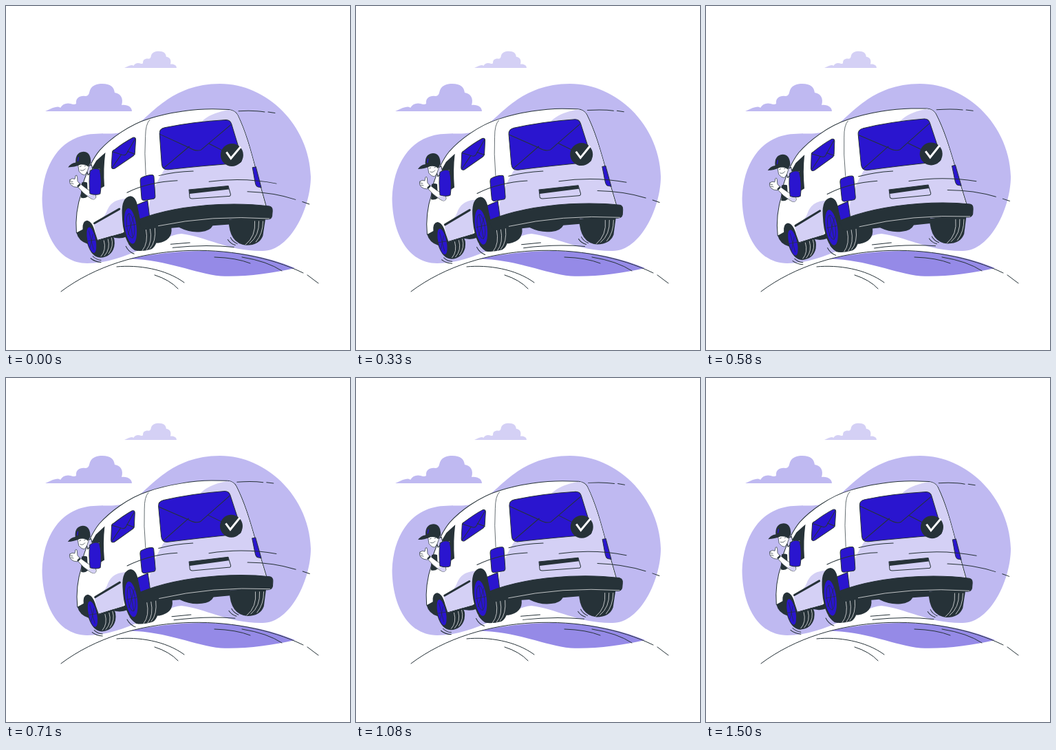
Write an HTML page that moves like this. It is 500 px wide and 500 px high and loops after 1.54 s.

```html
<!DOCTYPE html>
<html lang="en">
<head>
<meta charset="utf-8">
<title>Delivery van</title>
<style>
  html, body { margin: 0; width: 100%; height: 100%; overflow: hidden; background: #fff; }
  svg { display: block; width: 100vw; height: 100vh; }
  .blue { fill: #2a15cf; }
  .pale { fill: #d4d0f5; }
  .soft { fill: #bfb9f1; }
  .mid { fill: #958ae7; }
  .dark { fill: #263238; }
  .white { fill: #fff; }
  .line { stroke: #263238; stroke-width: 1; stroke-linecap: round; stroke-linejoin: round; }
  .thin { stroke-width: .7; }
  .open { fill: none; }
  .tread { fill: none; stroke: #fff; stroke-width: .7; stroke-linecap: round; }
</style>
</head>
<body>
<svg viewBox="0 0 500 500">
  <defs>
    <path id="cloud" d="M57 153L68 148Q77 145 79 148Q84 140 94 142Q99 144 102 142C101 133 108 130 115 131Q120 131 121 126C123 115 132 113 140 113C152 113 157 118 158 126C167 127 171 135 168 144C177 143 183 147 183 153Z"/>
  </defs>

  <path class="soft" d="M118 374C75 374 53 330 52.500 280C54 230 78 194 118 187C143 183 165 190 185 177C210 160 240 113 311 113C380 113 441 174 443 248C443 292 414 356 373 356C325 357 290 335 255 331C225 333 175 374 118 374Z"/>
  <use href="#cloud" class="soft"/>
  <use href="#cloud" class="pale" transform="translate(137.6 -2.3) scale(.603)"/>

  <g id="hill">
    <path class="mid" d="M180 367.500C260 351 345 350 420 381C385 389 345 394 312 392.500C275 389 235 369 180 367.500Z"/>
    <path class="line open" d="M80 415C180 340 335 341 432 388M438 391L454 403M161 379C192 376 232 382 259 402M216 391Q238 398 250 411M303 365Q335 366 355 374M343 365Q380 371 401 385"/>
  </g>

  <g id="van">
    <g id="underside">
      <path class="dark" d="M205 315L325 305L325 317L301 319Q297 327 284 328Q268 330 252 322L241 323Q243 341 222 345L208 345Z"/>
      <path class="dark" d="M324 310Q325 345 350 347Q369 347 374 333L378 305Z"/>
      <path class="tread" d="M368 312Q369 333 355 344M362 312Q364 334 349 346M374 312Q374 330 364 342"/>
      <path class="dark" d="M150 335Q164 341 176 336L176 325Z"/>
    </g>

    <path class="white line" d="M103 331C101 310 104 290 110 272L111 262C117 243 124 225 136 210.500C150 195 178 173 208 164C238 154 275 149.500 300 149.500L323 150Q332 151 336 158C348 182 355 208 363 237L379 292L200 315L170 331L132 342Z"/>
    <path class="pale" d="M323 150.500Q332 151 335.500 158C347 182 355 208 362.500 237L378 292L206 311C206 285 216 260 230 238L270 190C278 168 292 156 323 150.500Z"/>
    <path class="pale" d="M177 281C158 281 151 289 147 299C144 307 138 312 128 318L133 341L170 330.500Z"/>
    <path class="line thin open" d="M208 166Q202 172 202 190L201.500 215L203 246"/>

    <g id="rear">
      <path class="blue line" d="M230 177Q272 168 319 165Q325 165 327 171L342 219Q344 228 335 228Q288 232 236 238Q227 239 226 230L222.500 186Q222 179 230 177Z"/>
      <path class="line open" d="M223.500 187L266 206Q276 212 283 209L326 172M229 236L266 204M295 200L341 223"/>
      <circle class="dark" cx="328" cy="216" r="16.500"/>
      <path d="M320 212L326.500 221L340.500 204" fill="none" stroke="#fff" stroke-width="3"/>
      <path class="line open" d="M266 267L323 261L326.500 273Q327 276 323 276L271 280Q267 280 267 277Z"/>
      <path class="dark" d="M266 267L323 261L324 266L267 273Z"/>
      <path class="blue line" d="M358 234L363 233L371 263L366 262Q363 261 362 255Z"/>
      <path class="blue line" d="M197 250Q205 246 212 246Q215 246 215 250L217 277Q217 281 213 281L201 283Q197 283 197 278L195 255Q195 251 197 250Z"/>
      <path class="blue line" d="M190 290L206 283L209 307L195 312Z"/>
    </g>

    <g id="side">
      <path class="blue line" d="M157 210Q171 199 184 192Q188 191 188 195L187 213Q187 217 184 219L158 237Q153 239 153 234L154 214Q154 211 157 210Z"/>
      <path class="line open" d="M155 213L168 217Q173 219 175 215L187 194M154 236L167 217M176 212L187 216"/>
      <path d="M129 317L165 296" fill="none" stroke="#263238" stroke-width="3" stroke-linecap="round"/>
      <path class="dark" d="M144 214L131 226L124 238L136 238L138 266L143 263Q141 238 144 214Z"/>
    </g>

    <g id="front-wheel">
      <path class="dark" d="M103 331L112 326Q111 314 118 313Q126 314 130 330L134 342L155 335Q160 339 158 351Q154 366 138 367Q125 366 119 347Q106 343 103 331Z"/>
      <ellipse class="blue" cx="125" cy="341.500" rx="6" ry="19" transform="rotate(-12 125 341.500)"/>
      <path class="line thin open" d="M121 328L128 355M119 343L131 341M123 352L127 333"/>
      <path class="tread" d="M143 342Q147 356 139 365M149 340Q153 354 144 364M154 338Q158 350 150 361"/>
    </g>

    <g id="rear-wheel">
      <path class="dark" d="M169 302Q168 279 181 277Q190 278 192 295L197 320L221 322Q223 348 212 354Q198 358 188 356Q170 344 169 302Z"/>
      <ellipse class="blue" cx="181.500" cy="320.500" rx="8.500" ry="26" transform="rotate(-8 181.500 320.500)"/>
      <ellipse class="line thin open" cx="181.500" cy="320" rx="5.500" ry="18" transform="rotate(-8 181.500 320)"/>
      <path class="line thin open" d="M179 303L185 338M175 321L189 318M178 333L186 306"/>
      <path class="tread" d="M204 325Q208 345 199 356M210 324Q214 344 205 355M217 323Q219 343 210 353"/>
    </g>

    <path class="dark line" d="M193 311Q240 292 310 288Q350 286 383 290Q388 291 387.500 297L387 304Q386 309 380 309Q300 306 230 320L204 325Q199 326 196 320Z"/>
    <path class="tread" d="M222 320Q300 303 383 308"/>

    <g id="driver">
      <path class="pale line" d="M116 236L124 232L126 240L119 247Z"/>
      <path class="white line thin" d="M104 230L106 242Q110 247 114 247Q119 243 121 231Z"/>
      <path class="line thin open" d="M108 240Q112 242 115 238M107 235L109 234M114 234L116 233"/>
      <path class="dark" d="M90 236Q94 230 101 229Q100 214 112 213Q123 213 123 229L119 235Q116 231 108 232Q99 236 90 236Z"/>
      <path d="M105 221L104 227" fill="none" stroke="#2a15cf" stroke-width="1.500"/>
      <path class="dark" d="M110 258Q114 256 118 258L119 278Q114 282 109 280Z"/>
      <path class="white line thin" d="M104 261L107 259Q117 268 130 274L131 279Q129 285 122 280Q112 274 104 264Z"/>
      <path class="pale" d="M119 276L130 275L130 281Q127 284 122 279Z"/>
      <path class="white line thin" d="M93 254Q96 251 100 253L101 248Q103 246 103.500 250L104 256L108 261L104 265Q98 265 95 262Q91 258 93 254ZM93 256L97 257M94 259L98 260"/>
      <path d="M104 264L107.500 260.500" fill="none" stroke="#263238" stroke-width="2.500"/>
      <path class="blue line" d="M122 241Q130 235 136 239Q140 255 137 274Q132 277 122 274Q120 255 122 241Z"/>
    </g>

    <path class="line open" d="M337 152Q360 150.500 375 153M380 153L390 154.500M295 255Q345 248 393 257M351 269Q390 270 421 280M431 283L441 286.500M222 247Q245 241 272 240M176 272Q208 256 249 254M240 346.500L268 344M243 351.500Q290 346 332 350"/>
    <path class="line open" d="M124 368Q130 373 139 373.500M127 365Q132 370 139 370.500M175 350Q179 358 187 361M179 346Q184 354 192 356M323 339Q327 345 334 347M327 336Q330 342 337 345"/>
  </g>
</svg>
<script>
  const PERIOD = 1540, PEAK = 1350, TILT = 1;
  const van = document.getElementById("van");

  // Triangle wave: +1 at PEAK, -1 half a period later.
  function draw() {
    const phase = ((performance.now() - PEAK) / PERIOD % 1 + 1) % 1;
    const angle = TILT * (4 * Math.abs(phase - .5) - 1);
    van.setAttribute("transform", `rotate(${angle} 266 262)`);
    requestAnimationFrame(draw);
  }
  draw();
</script>
</body>
</html>
```
